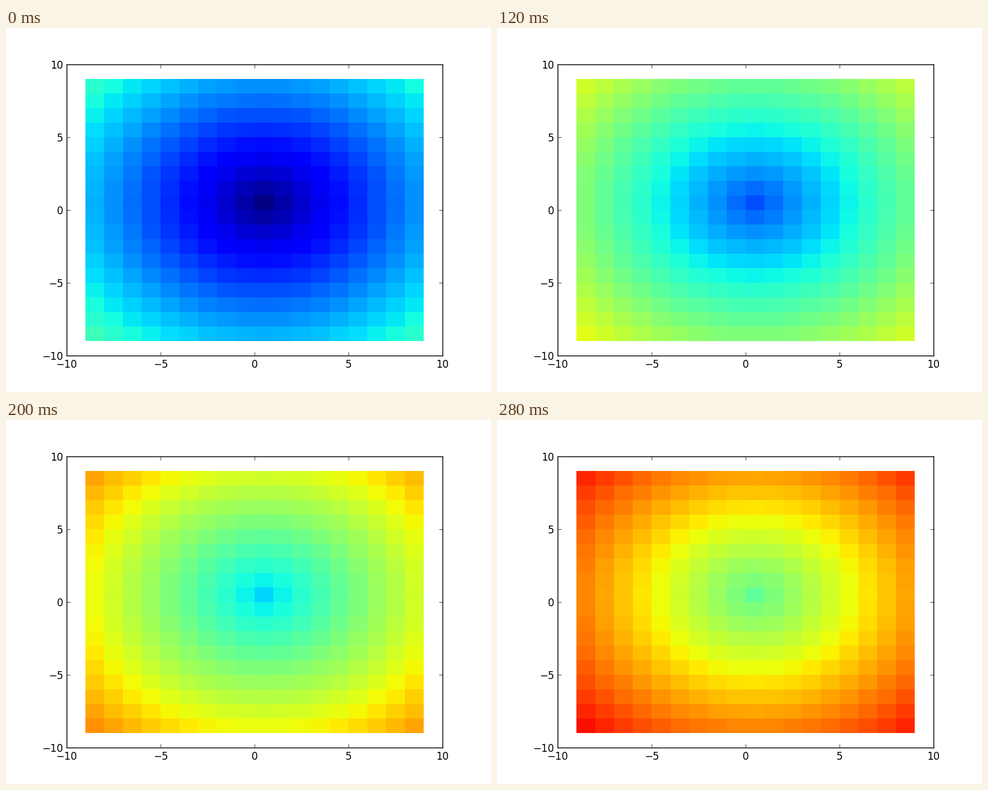
A matplotlib script that plays this animation: 800 px wide and 600 px high, repeating every 0.3 s.

```python
import numpy as np
import matplotlib.pyplot as plt
from matplotlib.animation import FuncAnimation

STEPS = 15

plt.rcParams.update({
    "font.family": "DejaVu Sans",
    "font.size": 12,
    "axes.linewidth": 1.0,
    "axes.unicode_minus": True,
})

fig = plt.figure(figsize=(8, 6), dpi=100, facecolor="white")
ax = fig.add_axes([0.125, 0.1, 0.775, 0.8])

# Distance from the origin, taken at each cell's lower left corner
edges = np.arange(-9, 10)
corner = edges[:-1]
distance = np.hypot(corner, corner.reshape(-1, 1))

mesh = ax.pcolor(edges, edges, distance, cmap="jet", vmin=0, vmax=30)

ticks = range(-10, 11, 5)
ax.set(xlim=(-10, 10), ylim=(-10, 10), xticks=ticks, yticks=ticks)
ax.tick_params(direction="in", top=True, right=True,
               length=4, width=0.5, pad=4)


def update(step):
    mesh.set_array(distance + step)
    return (mesh,)


anim = FuncAnimation(fig, update, frames=STEPS, interval=20,
                     repeat=True, repeat_delay=0, blit=False)
plt.show()
```
